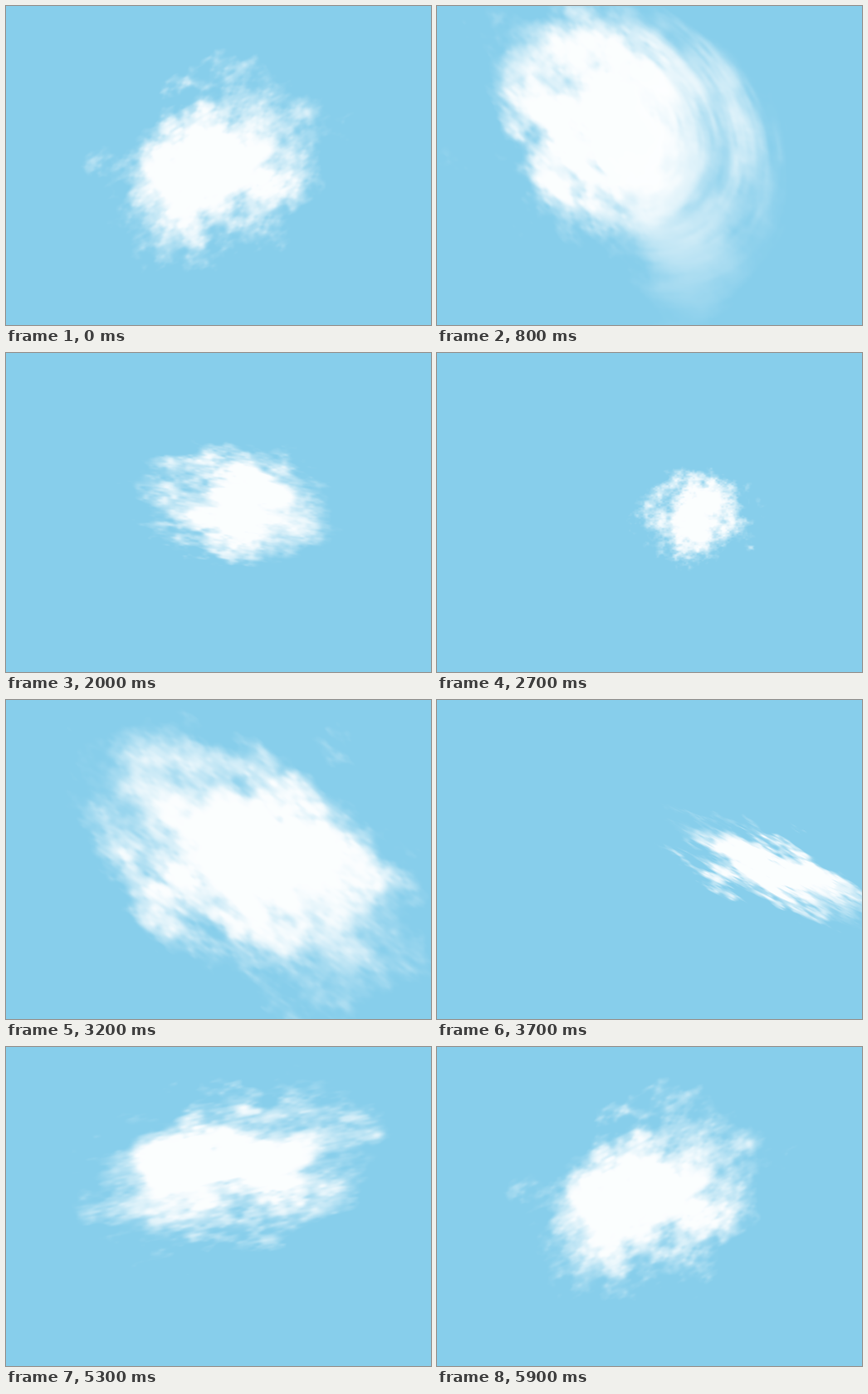
These frames come from a looping animation (512 px wide and 384 px high, 6000 ms). An HTML page with a canvas:

```html
<!DOCTYPE html>
<html lang="en">
<head>
<meta charset="utf-8">
<title>Drifting cloud</title>
<style>
html, body { margin: 0; width: 100%; height: 100%; overflow: hidden; background: #87ceeb; }
canvas { display: block; }
</style>
</head>
<body>
<canvas id="sky" width="512" height="384"></canvas>
<script>
const W = 512, H = 384, LOOP = 6000, STEP = 100;
const SIZE = 512, MASK = SIZE - 1;
const SKY = [135, 206, 235];
const OPACITY = .97;
const ctx = document.getElementById('sky').getContext('2d');
const image = ctx.createImageData(W, H);

// Key poses: time, x, y, half length, half width, angle
const POSES = [
  [0, 252, 190, 104, 79, -30],
  [800, 208, 136, 138, 100, 42],
  [1500, 268, 158, 172, 76, 11],
  [2100, 284, 189, 84, 50, 8],
  [2800, 316, 198, 50, 44, -5],
  [3150, 282, 190, 185, 120, 35],
  [3600, 408, 207, 104, 30, 31],
  [4200, 365, 205, 66, 58, 10],
  [4600, 298, 170, 132, 76, -10],
  [4900, 293, 149, 132, 64, -6],
  [5600, 250, 134, 128, 74, -15]
];

const loopPoses = [...POSES, [LOOP, ...POSES[0].slice(1)]];

function poseAt(t) {
  const i = loopPoses.findIndex(p => p[0] > t);
  const a = loopPoses[i - 1], b = loopPoses[i];
  const k = (t - a[0]) / (b[0] - a[0]);
  return a.slice(1).map((v, n) => v + (b[n + 1] - v) * k);
}

const clamp = (v, min, max) => Math.max(min, Math.min(max, v));
const pulse = (t, peak, width) => Math.exp(-(((t - peak) / width) ** 2));

function smooth(from, to, v) {
  const k = clamp((v - from) / (to - from), 0, 1);
  return k * k * (3 - 2 * k);
}

function randomizer(seed) {
  return () => {
    seed = (Math.imul(seed, 1664525) + 1013904223) >>> 0;
    return seed / 4294967296;
  };
}

// Tileable layered noise
function makeNoise(seed) {
  const field = new Float32Array(SIZE * SIZE), random = randomizer(seed);
  let gain = 1;
  for (let cells = 16; cells <= 128; cells *= 2, gain *= .62) {
    const grid = Float32Array.from({ length: cells * cells }, () => random() - .5);
    const cell = SIZE / cells;
    for (let y = 0; y < SIZE; y++) {
      const gy = Math.floor(y / cell), v = smooth(0, 1, y / cell - gy);
      const top = gy * cells, bottom = (gy + 1) % cells * cells;
      for (let x = 0; x < SIZE; x++) {
        const gx = Math.floor(x / cell), next = (gx + 1) % cells;
        const u = smooth(0, 1, x / cell - gx);
        const a = grid[top + gx] + (grid[top + next] - grid[top + gx]) * u;
        const b = grid[bottom + gx] + (grid[bottom + next] - grid[bottom + gx]) * u;
        field[y * SIZE + x] += (a + (b - a) * v) * gain;
      }
    }
  }
  return field;
}

const layers = [11, 29, 53, 87].map(makeNoise);
const pushX = new Float32Array(SIZE * SIZE), pushY = new Float32Array(SIZE * SIZE);

function mixNoise(phase) {
  const c = Math.cos(phase), s = Math.sin(phase);
  for (let i = 0; i < pushX.length; i++) {
    pushX[i] = c * layers[0][i] + s * layers[1][i];
    pushY[i] = c * layers[2][i] + s * layers[3][i];
  }
}

function sample(field, x, y) {
  const fx = Math.floor(x), fy = Math.floor(y), u = x - fx, v = y - fy;
  const x0 = fx & MASK, x1 = (fx + 1) & MASK;
  const r0 = (fy & MASK) * SIZE, r1 = ((fy + 1) & MASK) * SIZE;
  const a = field[r0 + x0] + (field[r0 + x1] - field[r0 + x0]) * u;
  const b = field[r1 + x0] + (field[r1 + x1] - field[r1 + x0]) * u;
  return a + (b - a) * v;
}

function ellipse([x, y, a, b, angle]) {
  const r = angle * Math.PI / 180, c = Math.cos(r), s = Math.sin(r);
  const local = (px, py) => {
    const dx = px - x, dy = py - y;
    return [(dx * c + dy * s) / a, (dy * c - dx * s) / b];
  };
  const radius = (px, py) => Math.hypot(...local(px, py));
  return { x, y, a, b, size: Math.sqrt(a * b), local, radius };
}

function draw(t) {
  const body = ellipse(poseAt(t));
  const tail = ellipse([body.x + 108, body.y + 84, 128, 76, 100]);
  const tailCover = .62 * pulse(t, 800, 300);
  const swirl = pulse(t, 1150, 700) + pulse(t, 4600, 350);

  // Detail grows with the cloud and is combed along its longer axis
  const detail = body.size / Math.min(1.3, body.size / 88);
  const comb = (body.a / body.b) ** .8;
  const reach = .62 * Math.min(110, body.size);
  mixNoise(t / LOOP * 2 * Math.PI);

  for (let y = 0; y < H; y++) {
    for (let x = 0; x < W; x++) {
      let cover = 0;
      const [u, v] = body.local(x, y), q = Math.hypot(u, v);
      const inTail = tailCover > .01 && tail.radius(x, y) < 2;
      if (inTail || q < 2.4) {
        const w = Math.min(1, swirl) * smooth(-.2, .6, (x - body.x) / body.a);
        const su = u * detail / Math.sqrt(comb), sv = v * detail;
        let nx = sample(pushX, su, sv) * (1 - w);
        let ny = sample(pushY, su, sv) * (1 - w);
        if (w > .01) {
          const arc = Math.atan2(v, u) * detail / 4, ring = q * detail;
          nx += sample(pushX, arc, ring) * w;
          ny += sample(pushY, arc, ring) * w;
        }
        const along = reach * Math.sqrt(comb);
        const px = x + nx * along, py = y + ny * reach;
        cover = OPACITY * smooth(1.38, .55, body.radius(px, py));
        if (inTail) {
          const streaks = clamp(.9 + 1.2 * ny * w, 0, 1.3);
          const wisp = tailCover * streaks * smooth(1.35, .4, tail.radius(px, py));
          cover = 1 - (1 - cover) * (1 - wisp);
        }
      }
      const i = (y * W + x) * 4;
      for (let n = 0; n < 3; n++) image.data[i + n] = SKY[n] + (255 - SKY[n]) * cover;
      image.data[i + 3] = 255;
    }
  }
  ctx.putImageData(image, 0, 0);
}

let shown = -1;
function tick() {
  const t = Math.floor(performance.now() % LOOP / STEP) * STEP;
  if (t !== shown) draw(shown = t);
  requestAnimationFrame(tick);
}
tick();
</script>
</body>
</html>
```
